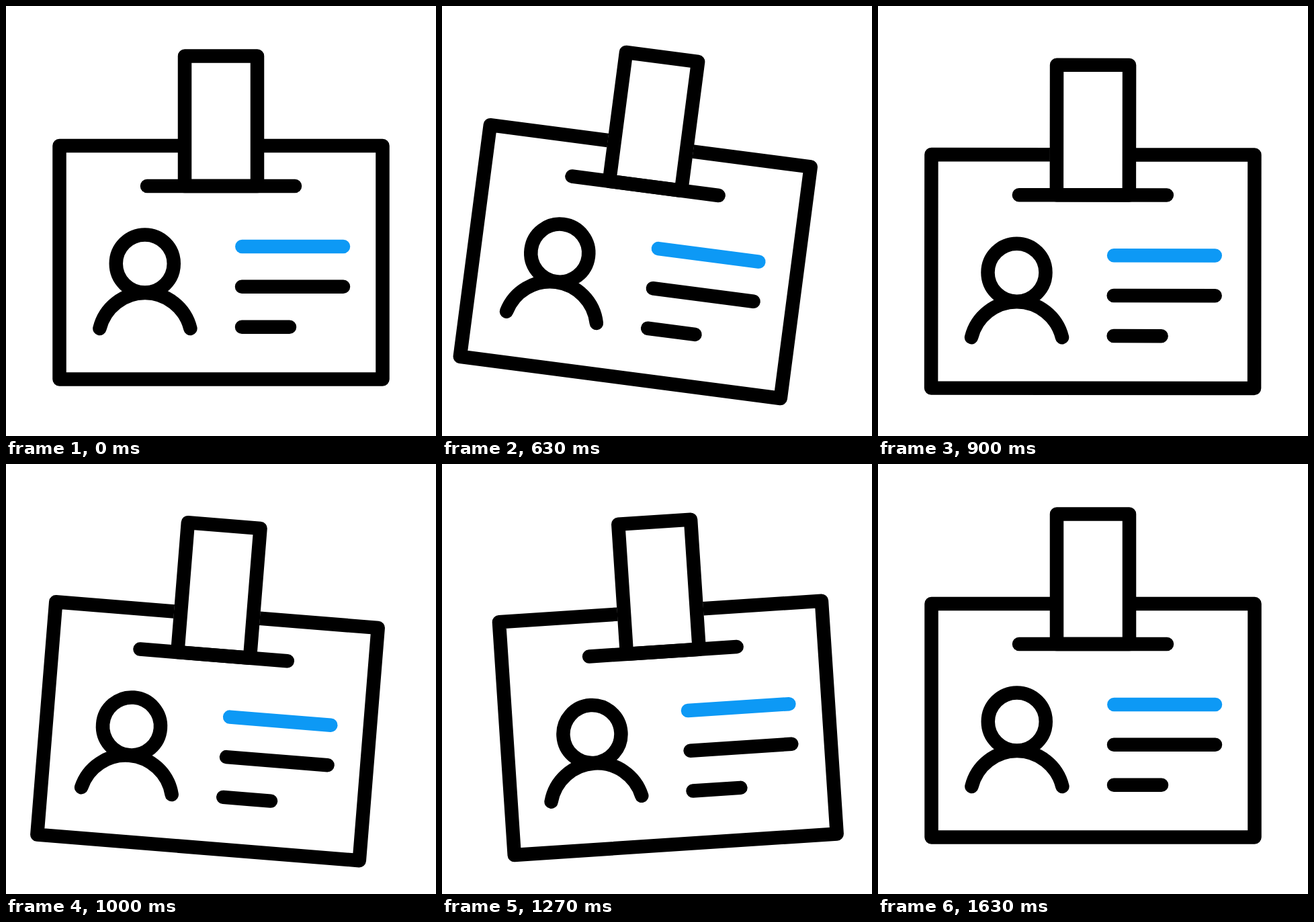
An HTML page that plays this animation: 640 by 640 pixels, repeating every 2.5 s.

```html
<!DOCTYPE html>
<html lang="en">
<head>
<meta charset="utf-8">
<title>Swinging badge</title>
<style>
  html, body { margin: 0; width: 100%; height: 100%; overflow: hidden; background: #fff; }
  svg { display: block; width: 100%; height: 100%; }
</style>
</head>
<body>
<svg viewBox="0 0 640 640">
  <g id="badge" fill="none" stroke="#000" stroke-width="20.5" stroke-linecap="round" stroke-linejoin="round">
    <path d="M256 208H79.5V555.5H560.5V208H384" stroke-linecap="butt"/>
    <path d="M266 74.5H374V268H266Z"/>
    <path d="M210 268H430"/>
    <circle cx="206.75" cy="383.5" r="43"/>
    <path d="M139.4 480A69.5 69.5 0 0 1 274.4 480"/>
    <path d="M351.3 358H502" stroke="#0d99f5"/>
    <path d="M351 417.7H502M351 477.7H422"/>
  </g>
</svg>
<script>
  const LOOP = 2500, STEP = 100 / 3;
  const PIVOT = "320 133";
  // [time in ms, value]
  const swing = [[437, 0], [605, 8], [810, -2.78], [1030, 5], [1050, 5], [1290, -4], [1633, 0]];
  const drop = [[566, 0], [1053, 17.4], [1605, 0]];
  const badge = document.getElementById("badge");

  // Eased value of a keyframe track at time t
  function valueAt(track, t) {
    const i = track.findIndex(key => key[0] > t);
    if (i < 1) return 0;
    const [t0, a] = track[i - 1], [t1, b] = track[i];
    const u = (t - t0) / (t1 - t0);
    return a + (b - a) * u * u * (3 - 2 * u);
  }

  function draw(now) {
    const t = Math.floor((now % LOOP + 4) / STEP) * STEP;
    badge.setAttribute("transform",
      `translate(0 ${valueAt(drop, t)}) rotate(${valueAt(swing, t)} ${PIVOT})`);
  }

  const start = performance.now();
  function tick() {
    draw(performance.now() - start);
    requestAnimationFrame(tick);
  }
  tick();
</script>
</body>
</html>
```
